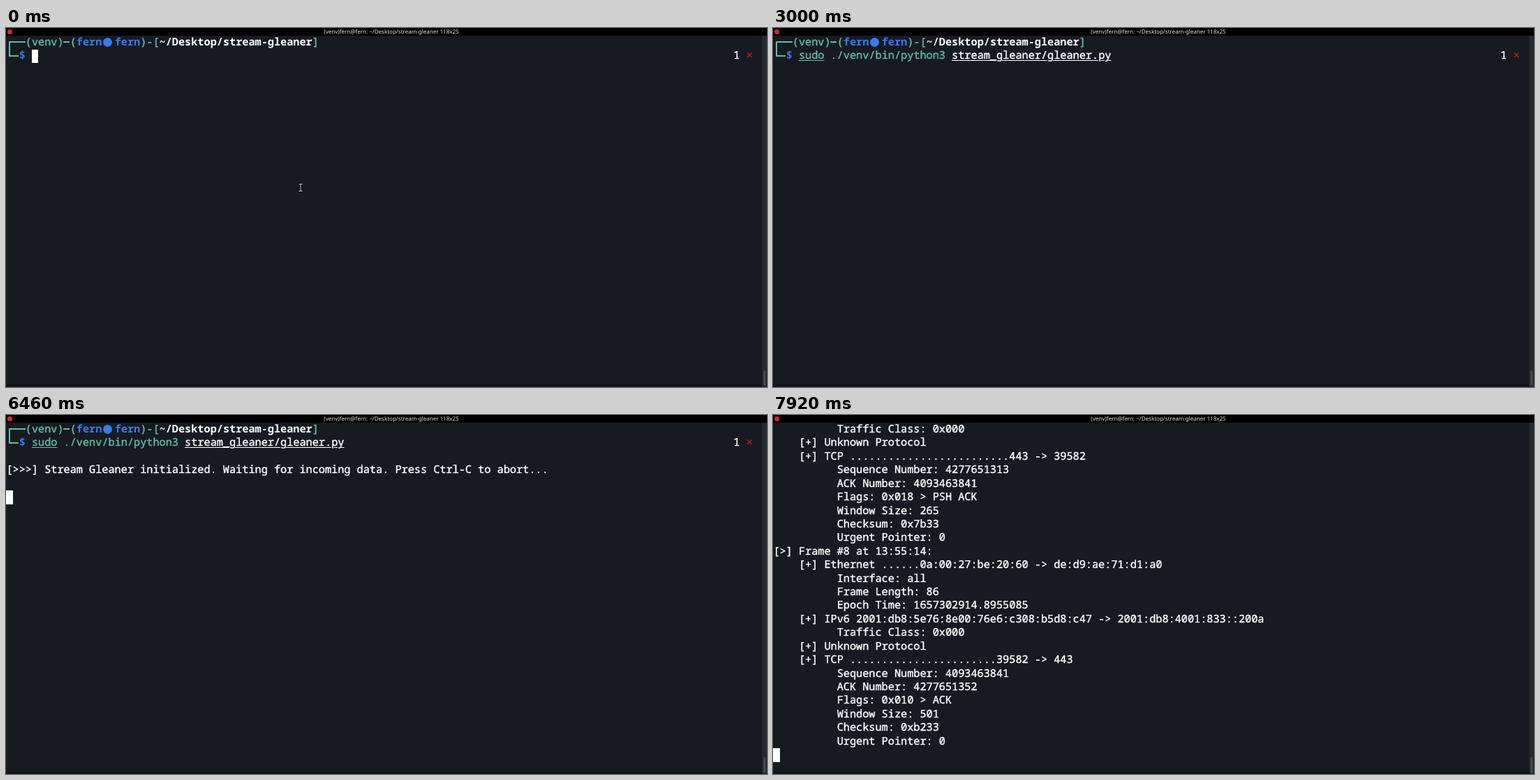
Recreate the animation shown at these times as an HTML page. Size 1090 by 514 pixels, loop 8000 ms.

```html
<!DOCTYPE html>
<html lang="en">
<head>
<meta charset="utf-8">
<title>Terminal</title>
<style>
  html, body { margin: 0; width: 100%; height: 100%; overflow: hidden; background: #171a21; }
  #stage { position: relative; width: 1090px; height: 514px; overflow: hidden; background: #171a21; color: #fff; }
  #stage > *, #prompt > * { position: absolute; }
  #bar { left: 0; top: 0; width: 1090px; height: 11px; background: #000; }
  #title { left: 552px; top: 0; transform: translateX(-50%); white-space: nowrap; color: #e4e4e4;
    font: 8px/11px "Noto Sans", "Open Sans", sans-serif; text-rendering: geometricPrecision; }
  #icon { left: 2px; top: 2px; width: 7px; height: 7px; border-radius: 50%; background: #d02a2a; }
  #track { left: 1083px; top: 11px; width: 7px; height: 503px; background: #262a30; }
  #thumb { left: 1085px; top: 490px; width: 3px; height: 22px; border-radius: 2px; background: #474a50; }
  #foot { left: 0; top: 511px; width: 1083px; height: 3px; background: #101318; }
  #text, #cursor, #status { margin: 0; white-space: pre; text-rendering: geometricPrecision;
    font: 500 15.23px/19.42px "Noto Sans Mono", "DejaVu Sans Mono", monospace;
    -webkit-text-stroke: 0.4px; }
  #text { left: 0.4px; top: 11px; }
  #cursor { width: 9.6px; height: 19.42px; color: #171a21; }
  #status { left: 1042px; top: 30.42px; }
  .teal { color: #5ebdab; }
  .blue { color: #367bf0; font-weight: 700; }
  .blue, b { -webkit-text-stroke: 0; }
  .grey { color: #8f9193; }
  .red { color: #c41c1c; }
  u { text-underline-offset: 2px; text-decoration-thickness: 1px; }
  .line { background: #5ebdab; }
  #logo { left: 139px; top: 13.5px; width: 13px; height: 13px; border-radius: 50%; background: #367bf0; }
</style>
</head>
<body>
<div id="stage">
  <div id="bar"></div>
  <div id="icon"></div>
  <div id="title">(venv)fern@fern: ~/Desktop/stream-gleaner 118x25</div>
  <div id="track"></div>
  <div id="thumb"></div>
  <div id="foot"></div>
  <div id="prompt">
    <div class="line" style="left:4px;top:19px;width:24px;height:2px"></div>
    <div class="line" style="left:4px;top:19px;width:2px;height:22px"></div>
    <div class="line" style="left:4px;top:39px;width:14px;height:2px"></div>
    <div class="line" style="left:82px;top:19px;width:9px;height:2px"></div>
    <div id="logo"></div>
    <div id="status">1 <span class="red">×</span></div>
  </div>
  <div id="cursor"></div>
  <pre id="text"></pre>
  <svg id="mouse" style="left:417px;top:221px" width="10" height="15" fill="none">
    <path d="M2.5 2.5H7.5M5 2.5V12.5M2.5 12.5H7.5" stroke="#000" stroke-width="3"/>
    <path d="M2.5 2.5H7.5M5 2.5V12.5M2.5 12.5H7.5" stroke="#d8d8d8"/>
  </svg>
</div>
<script>
const $ = id => document.getElementById(id);
const LOOP = 8000, CELL = 9.135, ROW = 19.42, LEFT = 0.3, TOP = 11.1;
const COMMAND = 'sudo ./venv/bin/python3 stream_gleaner/gleaner.py';
const BANNER = '[>>>] Stream Gleaner initialized. Waiting for incoming data. Press Ctrl-C to abort...';
const typing = [1470, 1550, 1620, 1700];
const ACCEPT = 2350, ENTER = 4070, READY = 4150;
const hidden = [[490, 1060], [3000, 3580], [4640, 5290], [5870, 6460], [7020, 7600]];

const span = (cls, s) => `<span class="${cls}">${s}</span>`;
const escape = s => s.replace(/>/g, '&gt;');

// Packet report lines
const detail = list => list.map(s => ' '.repeat(10) + s);
const layer = (name, from, to) => {
  const head = `    [+] ${name} `;
  return head + from.padStart(40 - head.length, '.') + ` -> ${to}`;
};
const ethernet = (n, sec, size, fraction, from, to) => [
  `[>] Frame #${n} at 13:55:${sec}:`,
  layer('Ethernet', from, to),
  ...detail(['Interface: all', `Frame Length: ${size}`, `Epoch Time: 16573029${sec}.${fraction}`])
];
const ipv4 = (from, to, id, flags, ttl, sum) => [
  layer('IPv4', from, to),
  ...detail(['DSCP: 0', 'Total Length: 52', `ID: ${id}`, `Flags: ${flags}`, `TTL: ${ttl}`,
    'Protocol: TCP', `Header Checksum: ${sum}`])
];
const tcp = (from, to, seq, ack, flags, size, sum) => [
  layer('TCP', from, to),
  ...detail([`Sequence Number: ${seq}`, `ACK Number: ${ack}`, `Flags: ${flags}`,
    `Window Size: ${size}`, `Checksum: ${sum}`, 'Urgent Pointer: 0'])
];

const ACK = '0x010 > ACK';
const macA = 'de:d9:ae:71:d1:a0', macB = '0a:00:27:be:20:60';
const hostA = '192.0.2.158', hostB = '192.168.1.2';
const unknown = [...detail(['Traffic Class: 0x000']), '    [+] Unknown Protocol'];
const requestTcp = tcp('52678', '80', 2064319291, 2006234851, ACK, 501, '0xbbe9');
const replyTcp = sum => tcp('80', '52678', 2006234851, 2064319291, ACK, 131, sum);

const screens = [
  [6700, [...requestTcp,
    ...ethernet(2, 13, 66, 6356688, macA, macB),
    ...ipv4(hostA, hostB, 36221, 'Not set', 56, '0x3984'),
    ...replyTcp('0x96b4')]],
  [7350, [...replyTcp('0x9403'),
    ...ethernet(4, 14, 66, 3258972, macB, macA),
    ...ipv4(hostB, hostA, 4104, "Don't fragment (DF)", 64, '0x6ef9'),
    ...requestTcp]],
  [7920, [...unknown,
    ...tcp('443', '39582', 4277651313, 4093463841, '0x018 > PSH ACK', 265, '0x7b33'),
    ...ethernet(8, 14, 86, 8955085, macB, macA),
    layer('IPv6', '2001:db8:5e76:8e00:76e6:c308:b5d8:c47', '2001:db8:4001:833::200a'),
    ...unknown,
    ...tcp('39582', '443', 4093463841, 4277651352, ACK, 501, '0xb233')]]
].map(([start, lines]) => [start, escape(lines.slice(-24).join('\n'))]);

const promptLine = '   ' + span('teal', '(venv) (') + span('blue', 'fern  fern') + span('teal', ')-[')
  + '<b>~/Desktop/stream-gleaner</b>' + span('teal', ']');

function commandLine(n) {
  if (!n) return '';
  if (n === COMMAND.length) {
    const [sudo, python, script] = COMMAND.split(' ');
    return span('teal', `<u>${sudo}</u> ${python}`) + ` <u>${script}</u>`;
  }
  const typed = COMMAND.slice(0, n);
  const word = n === 2 ? span('teal', typed) : n === 4 ? `<u class="teal">${typed}</u>` : `<u>${typed}</u>`;
  return word + ' ' + span('grey', COMMAND.slice(n + 1));
}

function state(t) {
  const screen = screens.filter(([start]) => t >= start).pop();
  if (screen) return { html: screen[1], row: 24, col: 0 };
  const n = t >= ACCEPT ? COMMAND.length : typing.filter(at => t >= at).length;
  const html = `${promptLine}\n  ${span('blue', '$')} ${commandLine(n)}`;
  if (t >= READY) return { html: `${html}\n\n${escape(BANNER)}`, row: 5, col: 0, shell: true };
  if (t >= ENTER) return { html, row: 2, col: 0, shell: true };
  const under = n ? COMMAND[n] || '' : '';
  return { html, row: 1, col: 4 + n, under, shell: true };
}

let shown;
function draw(now) {
  const t = now % LOOP;
  const { html, row, col, under = '', shell } = state(t);
  if (html !== shown) $('text').innerHTML = shown = html;
  $('prompt').style.display = shell ? '' : 'none';
  $('mouse').style.display = t < typing[0] ? '' : 'none';
  const cursor = $('cursor');
  cursor.textContent = under;
  Object.assign(cursor.style, {
    left: LEFT + col * CELL + 'px',
    top: TOP + row * ROW + 'px',
    background: under ? '#9b9c9e' : '#fff',
    visibility: hidden.some(([a, b]) => t >= a && t < b) ? 'hidden' : 'visible'
  });
  requestAnimationFrame(draw);
}
draw(0);
</script>
</body>
</html>
```
